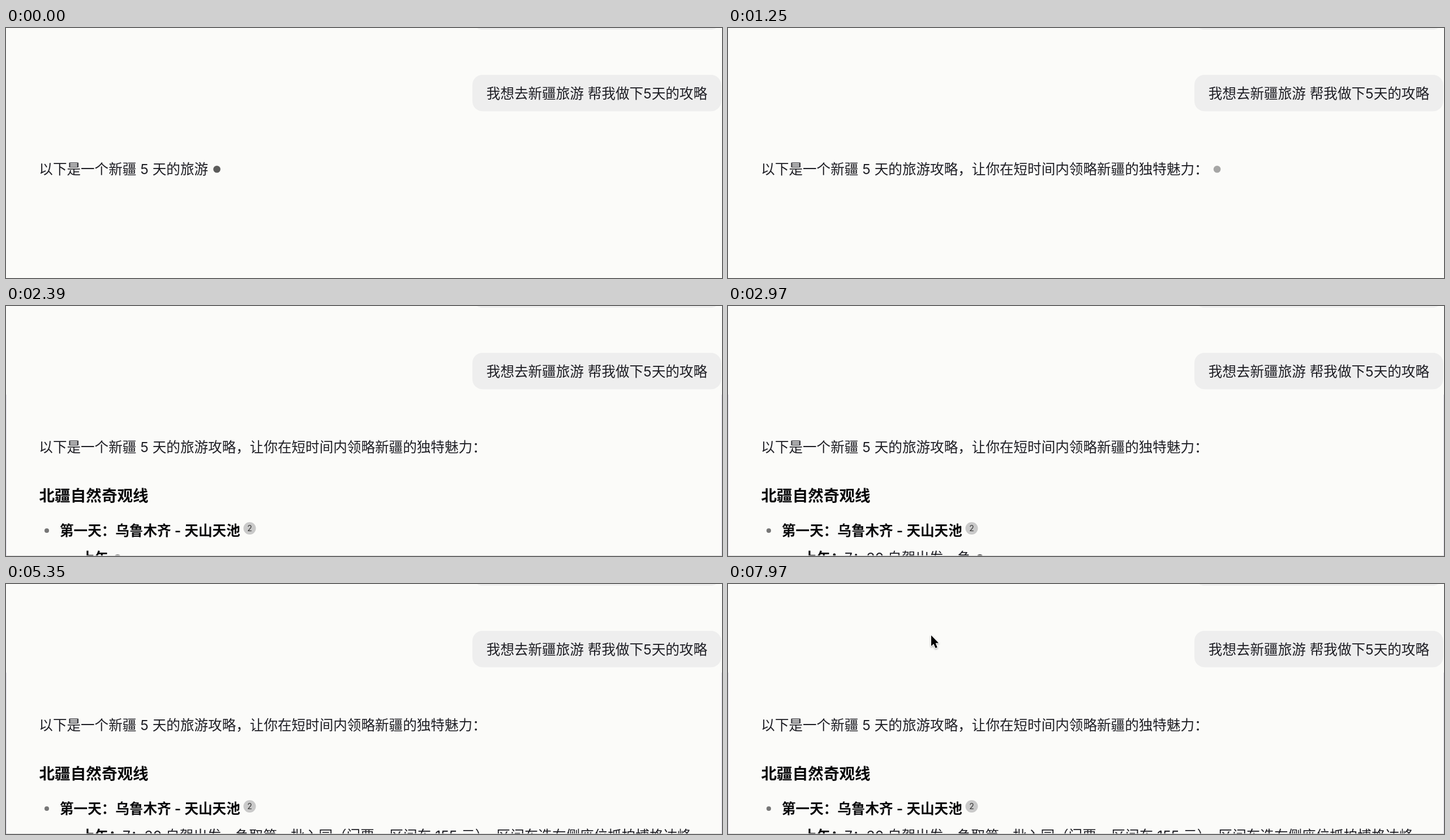
These frames come from a looping animation (1265x443 px, 7990 ms). An HTML page with a canvas:

```html
<!DOCTYPE html>
<html lang="zh-CN">
<head>
<meta charset="utf-8">
<title>旅游攻略</title>
<style>
html, body { margin: 0; width: 100%; height: 100%; overflow: hidden; background: #fbfbf9; }
canvas { display: block; }
</style>
</head>
<body>
<canvas id="stage" width="1265" height="443"></canvas>
<script>
const ctx = document.getElementById('stage').getContext('2d');
const LOOP = 7990;
const SIZE = 24.58;
const INK = '#1e1e24';
const DARK = '#08080a';
const font = (size, weight = 400) =>
  `${weight} ${size}px Inter, "Noto Sans CJK SC", "Noto Sans CJK", sans-serif`;
const BODY = font(SIZE);
const BOLD = font(SIZE, 600);

// Streamed reply, in typing order; y is the baseline.
const runs = [
  { x: 58.3, y: 259, font: BODY, text: '以下是一个新疆 5 天的旅游攻略，让你在短时间内领略新疆的独特魅力：' },
  { x: 58.5, y: 346, font: font(27.6, 600), text: '北疆自然奇观线', ink: DARK },
  { x: 95, y: 407, font: BOLD, text: '第一天：乌鲁木齐 - 天山天池', ink: DARK },
  { x: 132.5, y: 455, font: BOLD, text: '上午：', ink: DARK },
  { x: 206, y: 455, font: BODY, text: '7：30 自驾出发，争取第一批入园（门票 + ' },
  { x: 677.5, y: 455, font: BODY, text: '区间车 155 元）' },
  { x: 842, y: 455, font: BODY, text: '，区间车选右侧座位抓拍博格达峰' }
];
let total = 0;
for (const r of runs) { r.start = total; total += r.text.length; }
const [, heading, dayOne, morning] = runs;

// [ms, characters shown]
const pace = [[0, 14], [20, 14], [420, 24], [570, 24], [1000, 34.2], [1390, 34.2],
  [1850, 47.4], [2970, 70.4], [3070, 70.9], [4650, total + 0.9], [4700, total + 1]];

function typed(t) {
  for (let i = 1; i < pace.length; i++) {
    const [t0, n0] = pace[i - 1], [t1, n1] = pace[i];
    if (t < t1) return Math.floor(n0 + (n1 - n0) * (t - t0) / (t1 - t0));
  }
  return total + 1;
}

function label(text, x, y, style, ink = INK) {
  ctx.font = style;
  ctx.fillStyle = ink;
  ctx.fillText(text, x, y);
}

function disc(x, y, r, color) {
  ctx.fillStyle = color;
  ctx.beginPath();
  ctx.arc(x, y, r, 0, Math.PI * 2);
  ctx.fill();
}

function bubble(x, y, w, h) {
  ctx.fillStyle = '#eeeeee';
  ctx.beginPath();
  ctx.roundRect(x, y, w, h, 18);
  ctx.fill();
}

function outline() {
  ctx.fillStyle = '#dfdce9';
  ctx.fillRect(0, 157, 1, 286);
  ctx.fillRect(1264, 157, 1, 286);
  ctx.fillStyle = '#d6d6d6';
  ctx.fillRect(0, 442, 1265, 1);
}

function pulseDot(x, y, t) {
  const a = 0.66 + 0.3 * Math.cos(Math.PI * 2 * (t / 1000 + 85 / 360));
  disc(x, y, 6.3, `rgba(17,17,17,${a})`);
}

function pointer(x, y) {
  ctx.save();
  ctx.translate(x, y);
  ctx.scale(0.9, 0.9);
  ctx.beginPath();
  [[0, 0], [0, 21], [4.8, 16.6], [8.4, 25], [12, 23.5], [8.5, 15.3], [14.5, 15]]
    .forEach(([px, py]) => ctx.lineTo(px, py));
  ctx.closePath();
  ctx.shadowColor = 'rgba(0,0,0,.3)';
  ctx.shadowBlur = 3;
  ctx.shadowOffsetY = 1.5;
  ctx.lineWidth = 2.5;
  ctx.lineJoin = 'round';
  ctx.strokeStyle = '#fff';
  ctx.stroke();
  ctx.shadowColor = 'transparent';
  ctx.fillStyle = '#000';
  ctx.fill();
  ctx.restore();
}

function draw(t) {
  const n = typed(t);
  ctx.fillStyle = '#fbfbf9';
  ctx.fillRect(0, 0, 1265, 443);

  bubble(824, -61, 439, 64);
  bubble(824, 83, 439.5, 64.5);
  label('我想去新疆旅游 帮我做下5天的攻略', 848.8, 125, BODY);

  let end = null;
  for (const r of runs) {
    if (n <= r.start) break;
    const part = r.text.slice(0, n - r.start);
    label(part, r.x, r.y, r.font, r.ink);
    end = { x: r.x + ctx.measureText(part).width, y: r.y };
  }

  if (n > dayOne.start) disc(72, 398, 4, '#777');
  if (n > morning.start) {
    disc(430.5, 394, 11, '#c9c9c9');
    ctx.textAlign = 'center';
    label('2', 430.5, 399, font(14), '#333');
    ctx.textAlign = 'left';
  }
  if (n <= total) pulseDot(end.x + 15.5, end.y - 8.7, t);
  if (n > heading.start) outline();
  if (t >= 7890) pointer(359, 91);
}

function tick() {
  draw(performance.now() % LOOP);
  requestAnimationFrame(tick);
}
tick();
</script>
</body>
</html>
```
